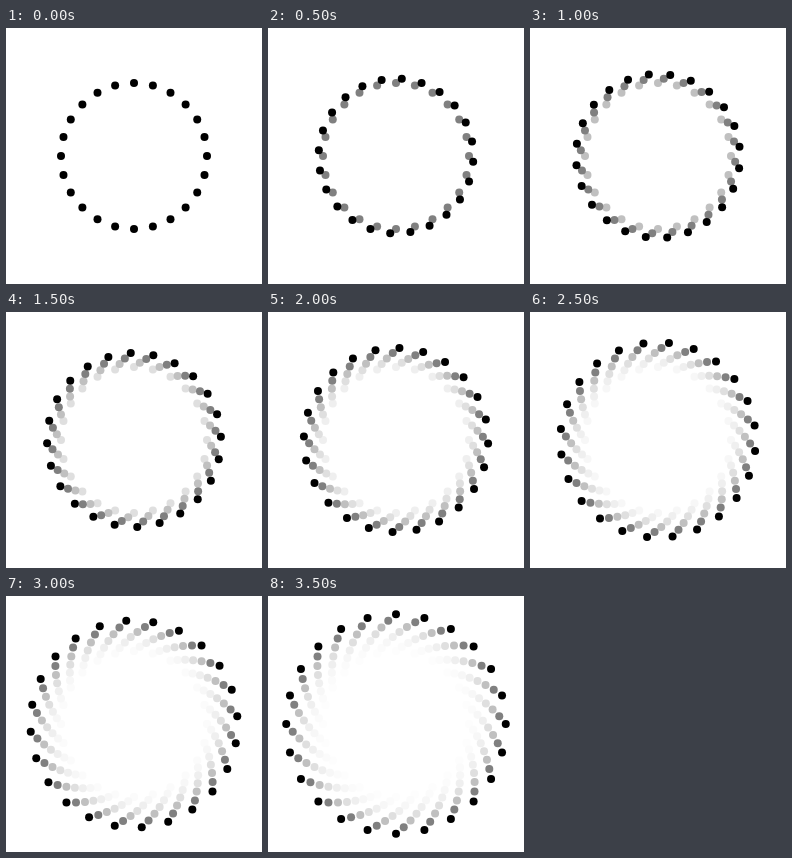
These frames come from a looping animation (256x256 px, 6000 ms). An HTML page with a canvas:

```html
<!DOCTYPE html>
<html lang="en">
<head>
<meta charset="utf-8">
<title>Dot spiral</title>
<style>
  html, body { margin: 0; width: 100%; height: 100%; overflow: hidden; background: #fff; }
  canvas { display: block; width: 256px; height: 256px; }
</style>
</head>
<body>
<canvas id="stage" width="256" height="256"></canvas>
<script>
const ctx = document.getElementById('stage').getContext('2d');
const LOOP = 6000, STEP = 500, LAST = 7;
const CENTER = 128, DOTS = 24, DOT_R = 4;
const START_R = 73, GROWTH = 1.06;
const TURN = Math.PI / 6 / LAST;

function drawRing(k) {
  ctx.fillStyle = '#000';
  const r = START_R * GROWTH ** k;
  for (let i = 0; i < DOTS; i++) {
    const a = i * 2 * Math.PI / DOTS + k * TURN;
    ctx.beginPath();
    ctx.arc(CENTER + r * Math.sin(a), CENTER - r * Math.cos(a), DOT_R, 0, 2 * Math.PI);
    ctx.fill();
  }
}

// Each new ring halves the strength of everything before it.
function draw(step) {
  ctx.fillStyle = '#fff';
  ctx.fillRect(0, 0, 256, 256);
  for (let k = 0; k <= step; k++) {
    ctx.fillStyle = 'rgba(255, 255, 255, 0.5)';
    ctx.fillRect(0, 0, 256, 256);
    drawRing(k);
  }
}

const start = performance.now();
let shown = -1;

function tick() {
  const t = (performance.now() - start) % LOOP;
  const step = Math.min(LAST, Math.floor(t / STEP));
  if (step !== shown) draw(shown = step);
  requestAnimationFrame(tick);
}
tick();
</script>
</body>
</html>
```
